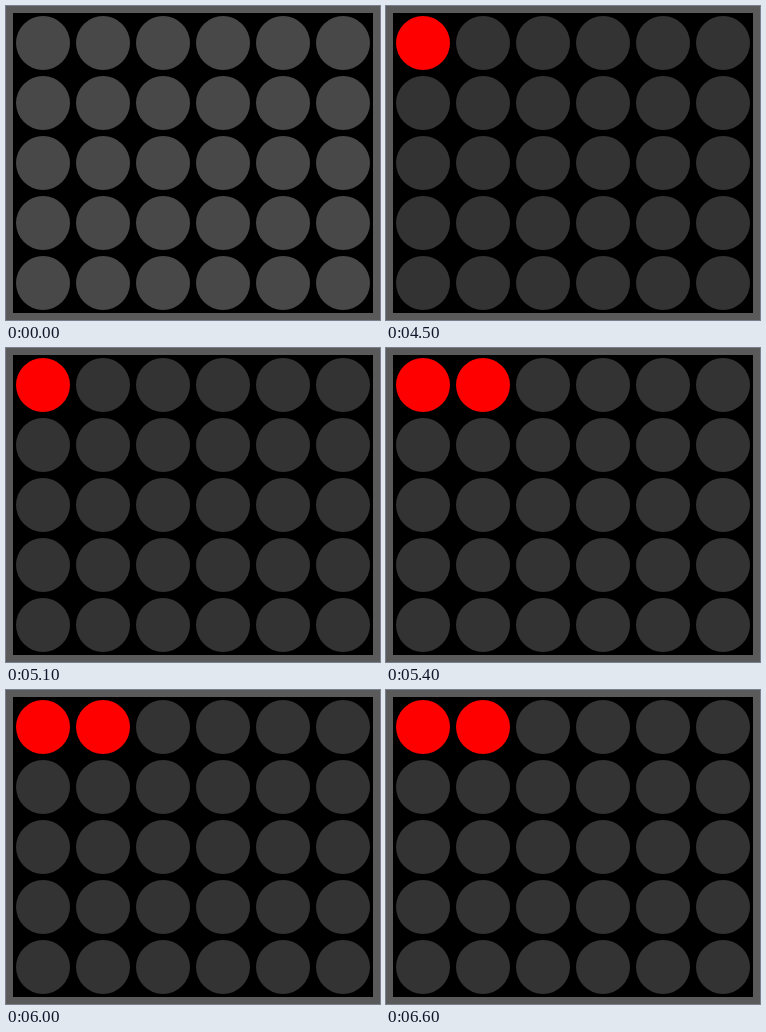
Animation of 374 by 314 pixels, one loop 6.9 s. Source, as an HTML page with a canvas:

```html
<!DOCTYPE html>
<html lang="en">
<head>
<meta charset="utf-8">
<title>Lamp panel</title>
<style>
  html, body { margin: 0; width: 374px; height: 314px; overflow: hidden; }
  canvas { display: block; }
</style>
</head>
<body>
<canvas width="374" height="314"></canvas>
<script>
const ctx = document.querySelector('canvas').getContext('2d');
const LOOP = 6900, START = 3900, BLINK = 300;
const COLS = 6, ROWS = 5, PITCH = 60, RADIUS = 27, FIRST = 37;

function lampColor(index, time) {
  if (time < START) return '#484848';
  const secondLit = Math.floor((time - START) / BLINK) % 2 === 1;
  return index === 0 || (index === 1 && secondLit) ? '#f00' : '#333';
}

function draw(time) {
  ctx.fillStyle = '#5a5a5a';
  ctx.fillRect(0, 0, 374, 314);
  ctx.fillStyle = '#000';
  ctx.fillRect(7, 7, 360, 300);
  for (let i = 0; i < COLS * ROWS; i++) {
    const x = FIRST + PITCH * (i % COLS);
    const y = FIRST + PITCH * Math.floor(i / COLS);
    ctx.fillStyle = lampColor(i, time);
    ctx.beginPath();
    ctx.arc(x, y, RADIUS, 0, 2 * Math.PI);
    ctx.fill();
  }
}

const began = performance.now();
function tick() {
  draw((performance.now() - began) % LOOP);
  requestAnimationFrame(tick);
}
tick();
</script>
</body>
</html>
```
